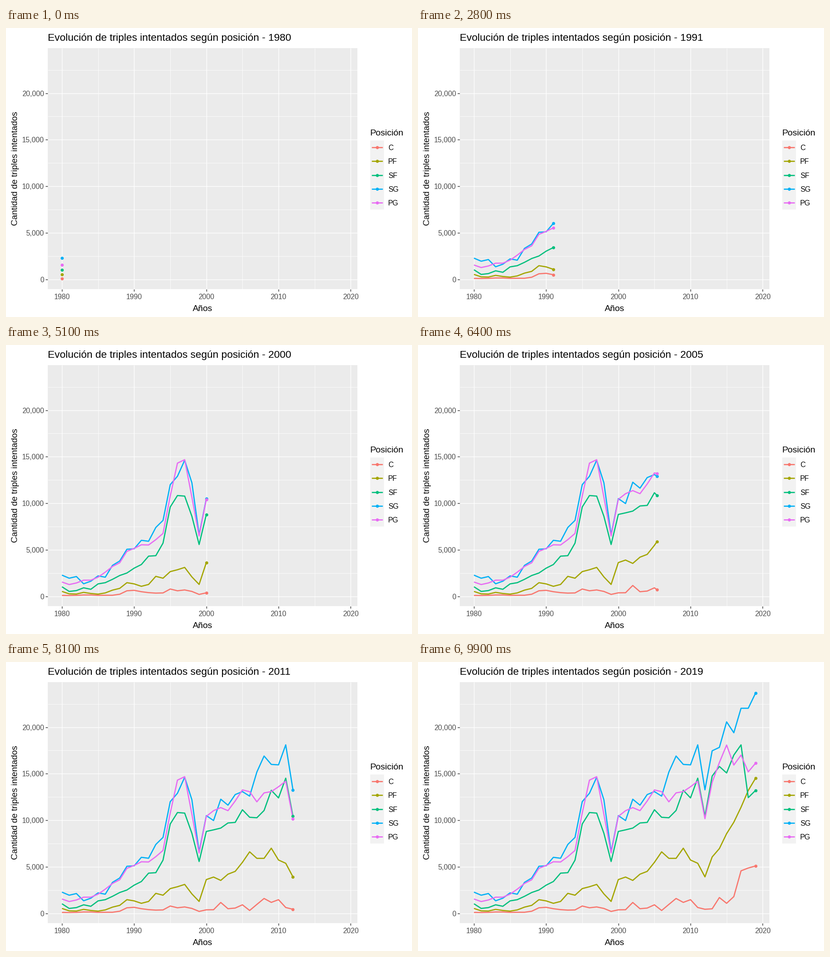
These frames come from a looping animation (885 by 632 pixels, 10000 ms). A matplotlib script:

```python
import numpy as np
import matplotlib.pyplot as plt
from matplotlib.animation import FuncAnimation
from matplotlib.patches import Rectangle

plt.rcParams["font.family"] = "Liberation Sans"

W, H, DPI = 885, 632, 72  # at 72 dpi one point is one pixel
FRAMES = 100
FIRST, LAST = 1980, 2019
LEFT, RIGHT, TOP, BOTTOM = 91.4, 766.4, 43.5, 571.4
TITLE = "Evolución de triples intentados según posición - {}"

c = [100, 90, 110, 150, 150, 110, 120, 120, 230, 600,
     650, 500, 400, 350, 370, 790, 600, 690, 530, 210,
     380, 390, 1170, 500, 570, 920, 310, 960, 1600, 1180,
     1470, 630, 440, 490, 1700, 1080, 1800, 4570, 4870, 5090]
pf = [530, 270, 250, 430, 310, 240, 370, 670, 860, 1470,
      1340, 1080, 1280, 2150, 1950, 2660, 2860, 3110, 2090, 1280,
      3630, 3900, 3540, 4210, 4510, 5480, 6610, 5910, 5910, 7000,
      5730, 5380, 3920, 6060, 6960, 8560, 9790, 11400, 13200, 14500]
sf = [1030, 530, 620, 920, 760, 1340, 1470, 1830, 2240, 2510,
      3030, 3420, 4320, 4370, 5720, 9600, 10830, 10770, 8600, 5570,
      8800, 8970, 9160, 9710, 9770, 11130, 10320, 10270, 11050, 13220,
      12400, 14520, 10430, 14750, 15780, 15080, 17000, 18100, 12430, 13200]
sg = [2280, 1950, 2130, 1350, 1630, 2200, 2060, 3330, 3800, 5060,
      5110, 6020, 5920, 7400, 8160, 12000, 12900, 14620, 12200, 6620,
      10500, 9970, 12260, 11620, 12760, 13080, 12590, 15180, 16900, 16000,
      15950, 18100, 13270, 17460, 17830, 20570, 19400, 22030, 22030, 23640]
pg = [1540, 1270, 1440, 1740, 1740, 2060, 2600, 3210, 3610, 4840,
      5150, 5540, 5520, 6090, 6760, 10780, 14310, 14680, 10650, 6480,
      10420, 11030, 11360, 11030, 12070, 13260, 13070, 11980, 12940, 13080,
      13600, 14200, 10170, 14080, 16200, 18080, 15930, 17000, 15200, 16120]

years = np.arange(FIRST, LAST + 1)
# Each year is reached on a whole frame
year_frames = np.rint((years - FIRST) * (FRAMES - 1) / (LAST - FIRST))


def px(year):
    return 122.0 + (year - FIRST) * 15.734


def py(value):
    return 549.7 - np.asarray(value) * 0.02036


fig = plt.figure(figsize=(W / DPI, H / DPI), dpi=DPI, facecolor="white")
ax = fig.add_axes([0, 0, 1, 1])
ax.set(xlim=(0, W), ylim=(H, 0))
ax.axis("off")


def box(x0, y0, x1, y1, color):
    ax.add_patch(Rectangle((x0, y0), x1 - x0, y1 - y0, fc=color, lw=0, zorder=0))


def rule(xs, ys, color, width, z=1):
    ax.plot(xs, ys, color=color, lw=width, solid_capstyle="butt", zorder=z)


def label(x, y, text, size, color="black", ha="left", **kw):
    return ax.text(x, y, text, size=size, color=color, ha=ha, va="baseline", **kw)


def curve(color):
    return ax.plot([], [], color=color, lw=2.6, solid_capstyle="butt",
                   solid_joinstyle="round", zorder=3)[0]


def dot(color):
    return ax.plot([], [], "o", color=color, ms=6.8, mew=0, zorder=4)[0]


# Panel, grid and axes
box(LEFT, TOP, RIGHT, BOTTOM, "#EBEBEB")
for year in range(1985, 2020, 10):
    rule([px(year)] * 2, [TOP, BOTTOM], "white", 0.75)
for value in range(2500, 25000, 5000):
    rule([LEFT, RIGHT], [py(value)] * 2, "white", 0.75)
for year in range(1980, 2021, 10):
    x = px(year)
    rule([x, x], [TOP, BOTTOM], "white", 1.4, 2)
    rule([x, x], [BOTTOM, BOTTOM + 5], "#333333", 1.4)
    label(x, 593, str(year), 15.6, "#4D4D4D", "center")
for value in range(0, 20001, 5000):
    y = py(value)
    rule([LEFT, RIGHT], [y, y], "white", 1.4, 2)
    rule([LEFT - 5, LEFT], [y, y], "#333333", 1.4)
    label(83, y + 6, f"{value:,}", 15.6, "#4D4D4D", "right")

title = label(91.2, 28, TITLE.format(FIRST), 22.4)
label(428.7, 619, "Años", 19, ha="center")
label(25, 307.5, "Cantidad de triples intentados", 19, ha="center",
      rotation=90, rotation_mode="anchor")

# Series and legend
label(793, 235, "Posición", 19.2)
box(793.5, 246, 824, 397, "#F2F2F2")
series = []
groups = [("C", "#F8766D", c), ("PF", "#A3A500", pf), ("SF", "#00BF7D", sf),
          ("SG", "#00B0F6", sg), ("PG", "#E76BF3", pg)]
for i, (name, color, values) in enumerate(groups):
    y = 261.2 + 30.2 * i
    curve(color).set_data([796.8, 821], [y, y])
    dot(color).set_data([808.9], [y])
    label(833.2, y + 6, name, 15.6)
    series.append((np.array(values), curve(color), dot(color)))


def update(frame):
    now = np.interp(frame, year_frames, years)
    past = years < now
    xs = px(np.append(years[past], now))
    for values, line, head in series:
        ys = py(np.append(values[past], np.interp(now, years, values)))
        line.set_data(xs, ys)
        head.set_data(xs[-1:], ys[-1:])
    title.set_text(TITLE.format(FIRST + frame * (LAST - FIRST) // (FRAMES - 1)))
    return [title] + [artist for s in series for artist in s[1:]]


anim = FuncAnimation(fig, update, frames=FRAMES, interval=100, repeat=True,
                     repeat_delay=0)
plt.show()
```
